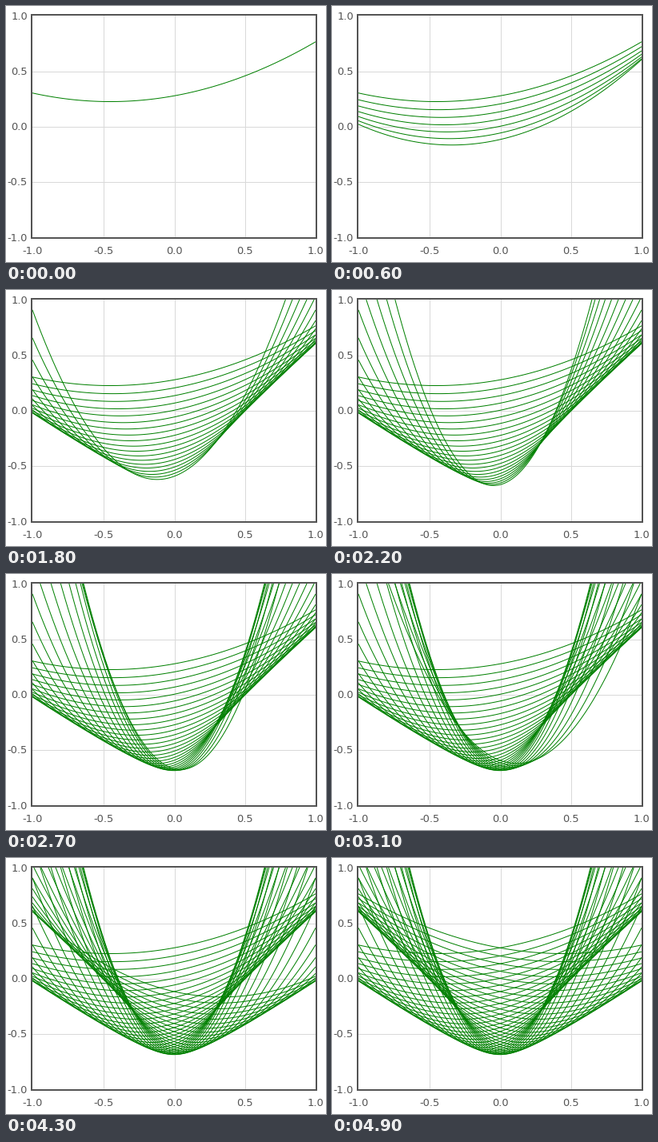
Write a matplotlib script that moves like this. It is 400 by 320 pixels and loops after 5000 ms.

```python
import numpy as np
import matplotlib.pyplot as plt
from matplotlib.animation import FuncAnimation
from matplotlib.collections import LineCollection
from matplotlib.patches import Rectangle

WIDTH, HEIGHT, DPI = 400, 320, 100
PX = 72 / DPI
LEFT, RIGHT, TOP, BOTTOM = 33, 387, 12, 289
FRAMES, INTERVAL = 50, 100
DIRECTRIX = -0.75
GRAY, GRID, GREEN = "#545454", "#d9d9d9", "#008000"

plt.rcParams["font.family"] = "DejaVu Sans"
fig = plt.figure(figsize=(WIDTH / DPI, HEIGHT / DPI), dpi=DPI, facecolor="white")


def add_layer(left, top, right, bottom, xlim, ylim):
    ax = fig.add_axes([left / WIDTH, 1 - bottom / HEIGHT,
                       (right - left) / WIDTH, (bottom - top) / HEIGHT])
    ax.set(xlim=xlim, ylim=ylim)
    ax.axis("off")
    return ax


def to_px(x, y):
    return (LEFT + (x + 1) / 2 * (RIGHT - LEFT),
            TOP + (1 - y) / 2 * (BOTTOM - TOP))


def parabola(focus_x):
    """Parabola whose focus rides on a steeper parabola above a fixed directrix."""
    focus_y = 9 * focus_x ** 2 - 0.625
    y = ((xs - focus_x) ** 2 / (2 * (focus_y - DIRECTRIX))
         + (focus_y + DIRECTRIX) / 2)
    return np.column_stack([xs, y])


stage = add_layer(0, 0, WIDTH, HEIGHT, (0, WIDTH), (HEIGHT, 0))
plot = add_layer(LEFT, TOP, RIGHT, BOTTOM, (-1, 1), (-1, 1))

for value in (-0.5, 0, 0.5):
    gx, gy = (int(v) + 0.5 for v in to_px(value, value))
    stage.plot([gx, gx], [TOP, BOTTOM], color=GRID, lw=PX)
    stage.plot([LEFT, RIGHT], [gy, gy], color=GRID, lw=PX)

stage.add_patch(Rectangle((LEFT - 1, TOP - 1), RIGHT - LEFT + 2, BOTTOM - TOP + 2,
                          fill=False, ec=GRAY, lw=2 * PX, zorder=3))

label_style = dict(color=GRAY, fontsize=13 * PX, va="baseline")
for value in (-1, -0.5, 0, 0.5, 1):
    tx, ty = to_px(value, value)
    label = f"{value:.1f}"
    stage.text(tx, 310, label, ha="center", **label_style)
    stage.text(27, np.floor(ty - 7) + 12, label, ha="right", **label_style)

xs = np.linspace(-1, 1, 201)
curves = [parabola(p) for p in np.linspace(-0.45, 0.45, FRAMES)]
lines = LineCollection([], colors=GREEN, linewidths=PX)
plot.add_collection(lines, autolim=False)


def update(frame):
    lines.set_segments(curves[:frame + 1])
    return [lines]


anim = FuncAnimation(fig, update, frames=FRAMES, interval=INTERVAL,
                     repeat=True, repeat_delay=0)
plt.show()
```
